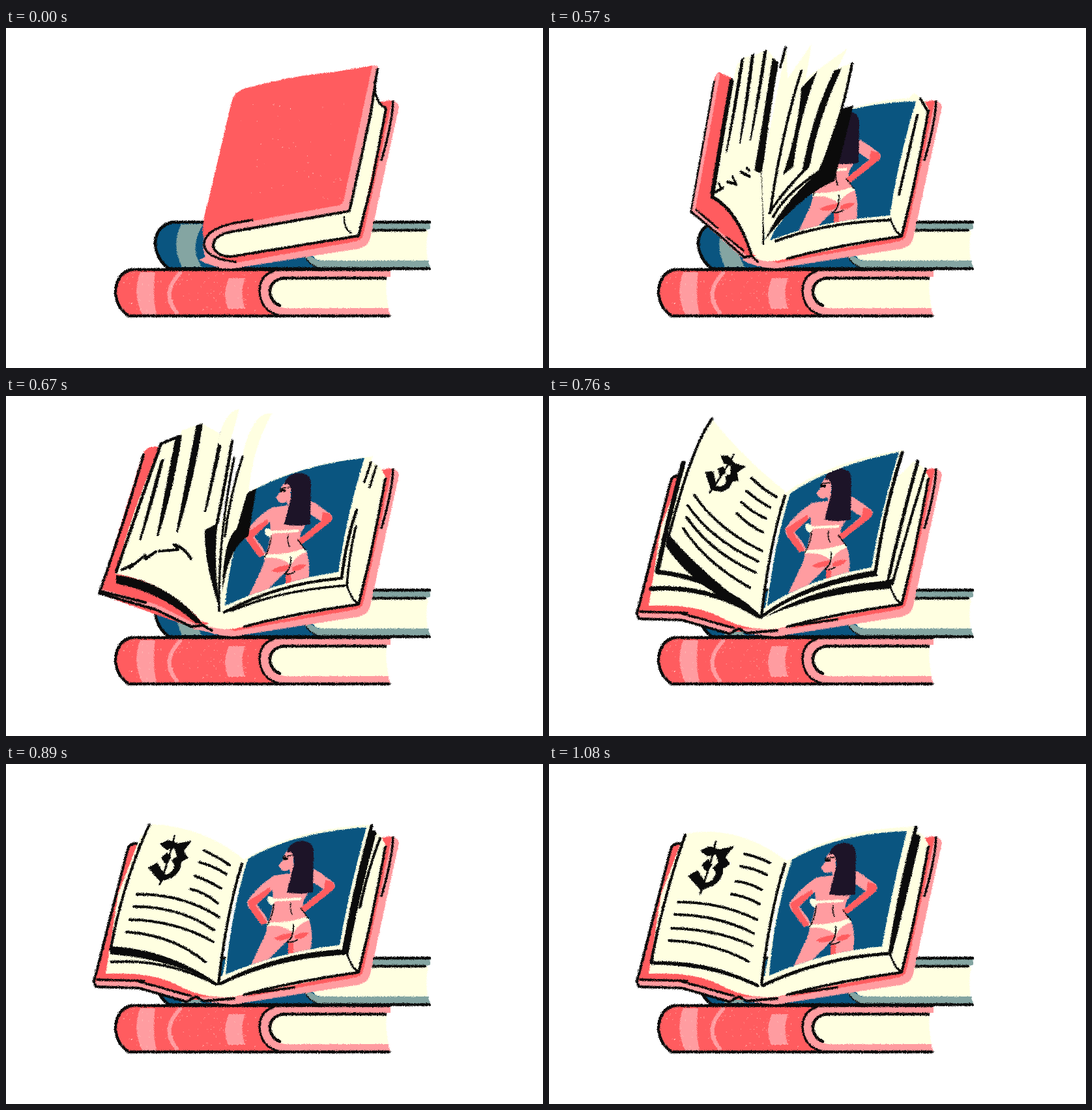
Animation, 824 px wide and 522 px high, one loop 1610 ms. Source, as an HTML page:

```html
<!DOCTYPE html>
<html lang="en">
<head>
<meta charset="utf-8">
<title>Books</title>
<style>
html, body { margin: 0; width: 100%; height: 100%; overflow: hidden; background: #fff; }
svg { display: block; width: 100vw; height: 100vh; }
</style>
</head>
<body>
<svg id="stage" viewBox="0 0 824 522"></svg>
<script>
const RED = '#ff5c5f', PINK = '#ff9ca0', CREAM = '#ffffe1', INK = '#0b0b0b',
      BLUE = '#0a5580', TEAL = '#84a5a2', HAIR = '#1d1428';

const fill = (color, d) => `<path d="${d}" fill="${color}"/>`;
const line = (width, d, color = INK) =>
  `<path d="${d}" fill="none" stroke="${color}" stroke-width="${width}" stroke-linecap="round" stroke-linejoin="round"/>`;
const group = (transform, content) => `<g transform="${transform}">${content}</g>`;

// Shadow between two pages: wide at the top, thin at the bottom.
const blade = (w, x1, y1, x2, y2) => fill(INK,
  `M${x1 - w} ${y1 + 3}L${x1 + 2} ${y1}Q${(x1 + x2) / 2 + w} ${(y1 + y2) / 2} ${x2 + 1} ${y2}H${x2 - 2}Z`);

// Blend every number of two path strings that share one structure.
function mix(a, b, t) {
  const to = b.match(/-?[\d.]+/g);
  let i = 0;
  return a.replace(/-?[\d.]+/g, n => +(+n + (to[i++] - n) * t).toFixed(2));
}
const mixAll = (a, b, t) => Object.fromEntries(Object.keys(a).map(k => [k, mix(a[k], b[k], t)]));

let seed = 7;
const random = () => (seed = seed * 16807 % 2147483647) / 2147483647;
function specks(count, x, y, w, h) {
  let d = '';
  while (count--) d += `M${(x + random() * w).toFixed(1)} ${(y + random() * h).toFixed(1)}h.1`;
  return line(1.1, d, '#ffc9c0');
}

// --- the two lying books
const blueBook =
  fill(BLUE, 'M255 298H570V369H250Q229 354 229 331Q233 303 255 298Z') +
  fill(TEAL, 'M269 301Q253 332 270 367H300Q280 334 303 301Z') +
  fill(TEAL, 'M540 299H651V309H540ZM455 345Q463 368 490 369H651L648 357H480Z') +
  fill(CREAM, 'M500 311H648Q643 335 647 357H484Q472 356 468 345Z') +
  line(4.5, 'M650 298H255Q230 304 229 331Q231 356 250 369.5H650') +
  line(4, 'M540 310.5H643') + line(1.5, 'M459 352Q466 364 478 367');

const redBook =
  fill(RED, 'M192 371H415V442H188Q169 428 168 404Q171 378 192 371Z') +
  fill(PINK, 'M206 375Q193 408 209 440H231Q224 408 229 375ZM342 384H367Q358 408 367 431H341Q331 408 342 384Z') +
  line(6, 'M267 376Q237 408 262 437', PINK) +
  fill(PINK, 'M590 373H415Q389 379 389 406Q391 436 418 441H590L586 430H430L415 407L430 382H590Z') +
  fill(CREAM, 'M584 384H428Q407 389 407 407Q408 427 428 430H587Q582 405 584 384Z') +
  line(4.5, 'M588 442H188Q168 428 168 403Q171 376 192 371H588') +
  line(3.5, 'M411 373Q389 380 389 404Q391 434 418 441') +
  line(4.5, 'M582 384H425Q404 389 405 406Q407 421 420 426') +
  specks(110, 178, 376, 206, 60);

const backCover =
  fill(PINK, 'M575 115Q598 104 603 121L559 322Q556 336 540 339L350 369Q320 369 296 356L330 340L530 312Z') +
  fill(RED, 'M574 113L592 112L549 314Q547 326 535 328L350 361L322 350L530 312Z') +
  line(3.5, 'M594 113Q592 150 576 203');

// --- closed and half-lifted book
const closed =
  fill(PINK, 'M567 57Q573 59 571 67L528 281L350 314L330 351L350 369Q302 374 302 330L348 110Z') +
  fill(CREAM, 'M565 100Q568 118 583 124L541 319L345 351Q318 348 318 333Q318 318 345 313L528 280Z') +
  fill(RED, 'M303 322Q299 302 310 267L346 114Q350 95 374 91Q440 73 500 68L562 58L518 265Q516 272 506 273L375 297Q316 306 303 322Z') +
  line(4, 'M570 63L559 135L527 281L345 313Q317 319 318 335Q323 351 345 351L541 319L562 235L583 124') +
  line(3.5, 'M566 82Q564 114 583 123') +
  line(3.5, 'M378 295Q302 304 304 334Q308 354 352 359') +
  line(2.5, 'M519 290Q518 308 530 315') + specks(45, 350, 105, 170, 160);

const lifting =
  fill(PINK, 'M505 47L514 56L471 264L345 312L330 351L352 367Q302 374 301 328L349 108Z') +
  fill(CREAM, 'M512 72L523 66L537 78L568 92L566 110L583 125L541 319L345 352Q318 350 318 334Q318 318 350 304L471 264Z') +
  fill(RED, 'M302 326Q297 304 307 264L347 112Q350 101 362 97Q430 70 504 48L463 241Q461 249 451 252Q318 294 302 326Z') +
  fill(INK, 'M513 69L524 67Q502 160 487 259L484 258Q492 160 508 90ZM541 97L556 94Q518 180 500 267L498 266Q507 180 541 97ZM564 112L574 111L578 120Q545 210 529 294L340 330Q390 300 521 288Q535 200 564 112Z') +
  line(3.5, 'M512 70L471 262Q380 287 343 306Q317 318 318 335Q323 352 345 352L541 319L563 230L580 128') +
  line(4, 'M537 79Q512 165 498 240') + line(3, 'M480 268Q400 285 360 302M506 269L518 279M526 305L531 317') +
  line(3.5, 'M362 287Q303 304 304 334Q311 354 352 358');

// --- the picture page
const woman =
  fill(PINK, 'M430 136Q424 144 424 150L417 159L422 166Q428 169 434 165L435 171L411 174Q389 187 370 212Q367 219 374 227L391 250L402 247L397 236L384 219L408 196Q411 226 400 248Q399 263 391 277L374 313L402 303L433 272L432 300L466 294Q472 261 463 239Q447 223 461 204L469 184L486 195L450 225L458 230L501 196Q507 190 501 184L474 165L440 160V136Z') +
  fill(RED, 'M370 214L374 227L391 250L400 247L382 220L405 199L404 192ZM489 181L487 195L450 225L458 230L501 196Q506 190 500 184ZM410 271Q420 277 434 270L440 262Q420 264 410 271ZM442 271Q455 274 464 262Q452 260 442 267ZM432 276L440 278V294H432Z') +
  fill(CREAM, 'M400 208Q404 203 411 210L452 208V212L412 214L408 220Q400 218 400 208ZM399 246Q430 248 461 237L465 242Q446 249 440 263Q425 248 399 252Z') +
  fill(HAIR, 'M430 139Q434 122 453 121Q471 122 471 138L470 200Q450 204 430 200L438 168Q445 148 436 138Z') +
  line(4, 'M425 148H430') + line(1.6, 'M424 145L438 143M410 218Q409 235 400 250M436 217Q434 226 438 234M451 224L463 240') +
  line(1.8, 'M440 250Q441 270 430 276Q438 278 446 273');

let clips = 0;
const picture = (d, shift) => {
  const id = 'clip' + clips++;
  return `<clipPath id="${id}"><path d="${d}"/></clipPath>` + fill(BLUE, d) +
    `<g clip-path="url(#${id})">${group(`translate(${shift})`, woman)}</g>`;
};

const rightBlock =
  fill(CREAM, 'M326 330L560 100L575 110L583 125L541 320L350 357Q325 361 292 349L300 330Z') +
  line(4, 'M582 127Q563 235 541 320Q440 334 366 354') + line(3, 'M524 293Q529 310 539 318');

// --- fluttering pages
const fanLeft =
  fill(RED, 'M225 68L258 78L208 258L290 270L310 350L290 357L158 283L212 82Q216 69 225 68Z') +
  line(8, 'M222 73L164 280L238 324L290 354L340 364', PINK) +
  line(4, 'M213 82L158 282L220 315L284 352L302 350L316 359') +
  line(3.5, 'M170 279L221 307M242 321L283 342') +
  fill(CREAM, 'M250 100L268 55L284 45L306 43L336 33L364 52L328 220L331 354L300 346Q268 285 207 258Z') +
  line(10, 'M254 82Q230 170 209 254') + line(6, 'M207 259Q266 278 300 346') +
  blade(6, 282, 45, 242, 192) + blade(6, 306, 39, 274, 178) + blade(6, 336, 33, 299, 173) +
  fill(INK, 'M350 46L365 53Q340 145 327 224L308 219Q330 135 350 46Z') +
  line(4, 'M325 222Q331 270 329 331') +
  line(4.5, 'M216 252L234 245M224 238L230 247M244 236L266 240M256 228L265 240M276 221L297 228M290 215L296 219');
const fanRight =
  fill(CREAM, 'M364 28L366 78L403 24L394 78L458 31L443 62L467 53L440 160L412 224L331 331L326 222Z') +
  fill(INK, 'M387 92L412 66Q383 140 375 213L359 226Q384 150 387 92ZM438 65L449 62Q411 145 401 209L388 221Q405 130 438 65ZM448 124L467 119L438 235Q385 257 331 326Q356 270 415 220Z') +
  line(4, 'M363 30L355 60M387 66Q355 170 340 280M465 55Q447 150 415 220Q360 257 344 290M398 212Q360 250 338 284');
const fanPicture =
  fill(CREAM, 'M440 132Q500 108 570 107L526 292Q420 300 330 334L345 300Z') +
  picture('M440 132Q500 113 563 113Q536 200 523 288Q420 295 339 326L360 280Z', '5 7') +
  line(4, 'M348 327Q425 298 522 295M570 109L581 127M565 134Q552 190 537 256');

const flutter =
  fill(RED, 'M222 78L240 78L170 272L290 280L310 350L290 357L143 304L208 94Q213 80 222 78Z') +
  line(8, 'M148 301L230 324L290 354L340 364', PINK) +
  line(4, 'M211 90Q186 180 143 303L230 328L284 354L302 352L316 360M146 300L214 317') +
  fill(CREAM, 'M238 75L265 64L270 53L300 42L347 68L345 110L326 200L331 354L300 346Q245 285 168 273Q195 170 238 75Z') +
  line(4.5, 'M266 62L238 73Q200 180 169 270') + fill(INK, 'M169 275Q250 285 302 350L290 348Q240 302 169 288Z') +
  blade(8, 268, 60, 233, 215) + blade(8, 300, 42, 263, 209) + blade(4, 241, 96, 206, 222) +
  blade(4, 333, 52, 306, 178) + line(4.5, 'M347 69Q337 130 324 195') +
  line(4, 'M178 267L195 258L190 264L214 244V250L230 239M235 238L264 236L258 228Q273 232 284 250') +
  fill(CREAM, 'M358 20Q334 24 325 72L340 85ZM408 27Q378 22 362 95L326 205L330 335L372 150Q378 80 408 27Z') +
  fill(CREAM, 'M370 148Q450 103 562 93L518 278Q420 285 328 337Z') +
  picture('M377 146Q450 106 550 95Q523 180 510 270Q420 284 336 322Q345 235 377 146Z', '-3 -3') +
  fill(INK, 'M305 206L325 195Q317 250 329 330Q304 260 305 206ZM370 149L384 142L372 215Q342 232 332 300Q333 220 354 204Z') +
  line(3.5, 'M350 95Q325 220 327 330M363 93Q344 150 336 215') +
  line(4.5, 'M538 175Q521 225 515 280Q420 287 335 332') +
  line(3.5, 'M537 200Q527 240 523 291Q420 298 345 330M560 102L550 132M568 108L558 140');

// --- the open spread settling: three key poses
const high = {
  leaf: 'M250 35Q298 95 362 146Q340 230 326 338Q250 270 185 215Q205 120 250 35Z',
  edge: 'M250 35Q218 80 184 215',
  shade: 'M182 210Q235 274 326 338Q225 300 179 230Z',
  under: 'M206 103Q180 200 166 270Q250 278 325 338M157 296Q245 290 322 338',
  underWidth: '7',
  rows: 'M311 126Q330 145 349 155M303 146Q321 161 339 171M295 163Q312 179 333 188M288 180Q308 200 328 209' +
        'M223 152Q258 204 327 238M213 168Q248 220 321 254M211 186Q248 240 317 271M206 203Q240 256 308 294',
  glyph: 'matrix(.72 .45 -.25 .87 268 121)',
  paper: 'M361 150Q430 100 543 83Q515 180 503 272Q400 285 330 336Z',
  photo: 'M370 150Q430 108 537 86Q508 180 495 263Q400 280 335 322Q345 230 370 150Z',
  shift: '-7 -10',
  rim: 'M542 87Q513 180 501 270Q400 286 330 336',
  hem: 'M514 284L528 280L524 296Q420 301 332 339Q410 291 514 284ZM497 264L505 276Q400 291 329 338Q390 283 497 264Z',
  fore: 'M566 100Q541 190 519 288',
  foreWidth: '5',
  stack: 'M578 112Q551 200 527 288'
};
const low = {
  leaf: 'M220 92Q305 96 365 147Q343 230 326 338Q250 284 160 280Q180 180 220 92Z',
  edge: 'M220 93Q180 180 161 282',
  shade: 'M160 278Q250 278 326 338Q250 299 160 292Z',
  under: 'M206 123Q178 220 160 285Q240 283 325 338M162 304Q245 298 322 338',
  underWidth: '4',
  rows: 'M304 133Q324 142 343 155M297 151Q318 156 338 169M290 172Q308 178 330 191M283 192Q304 196 325 214' +
        'M201 200Q270 199 327 235M196 219Q265 218 319 255M190 239Q260 240 318 273M185 258Q255 262 306 304',
  glyph: 'matrix(.95 .03 0 .95 251 148)',
  paper: 'M365 147Q440 100 561 93Q535 190 520 288Q415 292 330 337Z',
  photo: 'M371 146Q440 105 553 97Q525 200 512 278Q420 288 337 323Q345 230 371 146Z',
  shift: '1 -3',
  rim: 'M561 95Q535 190 518 287Q415 292 330 337',
  hem: 'M514 285L526 284L522 293Q420 297 332 338Q410 291 514 285ZM514 284L522 291Q420 297 330 338Q410 290 514 284Z',
  fore: 'M564 106Q541 190 522 288',
  foreWidth: '8',
  stack: 'M574 114Q556 160 543 220'
};
const rest = {
  leaf: 'M209 107Q290 92 365 149Q343 230 326 340Q250 300 158 303Q178 200 209 107Z',
  edge: 'M209 109Q175 205 157 304',
  shade: 'M157 301Q240 299 320 340Q240 308 157 308Z',
  under: 'M209 109Q176 210 157 304Q240 302 320 340M157 304Q240 303 320 340',
  underWidth: '5',
  rows: 'M300 138Q320 142 339 152M294 157Q315 160 334 170M287 180Q307 182 326 193M280 200Q302 203 323 215' +
        'M198 212Q265 212 319 239M193 231Q260 232 314 260M188 252Q258 254 312 279M184 271Q250 273 306 303',
  glyph: 'matrix(1 0 0 1 248 159)',
  paper: 'M365 149Q440 100 562 96Q538 190 523 291Q420 298 328 340Z',
  photo: 'M373 147Q440 107 549 103Q525 200 511 280Q420 288 338 325Q345 230 373 147Z',
  shift: '0 0',
  rim: 'M563 97Q538 190 523 291Q420 296 328 340',
  hem: 'M518 290L526 288L524 293Q420 298 330 340Q410 294 518 290ZM518 290L524 293Q420 298 328 340Q410 294 518 290Z',
  fore: 'M563 111Q543 200 523 288',
  foreWidth: '8',
  stack: 'M568 112Q549 195 526 285'
};

const letter =
  fill(INK, 'M-16 -26L-2 -33L14 -28L36 -33L23 -16L30 -5L19 2Q20 16 4 28L-15 35L-35 13L-20 4L-8 23Q5 22 8 8L3 0L12 -7L8 -20L-5 -17ZM-14 -4L-4 -13L3 -4L-7 6Z') +
  line(3, 'M8 -40Q0 -5 -16 40');

const openBase =
  fill(RED, 'M207 122H194Q188 122 186 130L135 333L204 341L278 362L335 362L326 330Z') +
  fill(PINK, 'M137 333L205 335L286 357L345 358L375 354L350 369L302 365L291 357L276 366L204 345L137 342Z') +
  line(4, 'M204 122Q191 120 187 130L135 334L138 342L204 344L277 365L291 357L303 364L350 360') +
  line(3.5, 'M140 331L212 333M204 334L283 356M365 354L442 343') +
  fill(CREAM, 'M207 109L172 200L153 322Q222 319 262 339Q300 360 340 357L326 330L320 180Z');

const spread = s => openBase + rightBlock +
  line(s.underWidth, s.under) + line(4, s.stack) + line(s.foreWidth, s.fore) + fill(INK, s.hem) +
  fill(CREAM, s.paper) + picture(s.photo, s.shift) + line(5, s.rim) +
  fill(INK, s.shade) + fill(CREAM, s.leaf) + line(4, s.edge) +
  line(4, s.rows) + group(s.glyph, letter) +
  line(4, 'M362 153Q338 230 326 338');

const turning = { ...high,
  leaf: 'M322 24Q338 100 361 150Q340 230 326 338Q285 250 232 178Q270 90 322 24Z',
  edge: 'M322 24Q272 85 232 178',
  shade: 'M230 176Q268 262 326 338Q250 280 226 195Z',
  rows: high.rows.replace(/(\d+) (\d+)/g, (_, x, y) => `${326 + (x - 326) * .6} ${y - 12}`),
  glyph: 'matrix(.4 .4 -.1 .9 304 98)'
};

const poses = [
  [0, closed],
  [500, lifting],
  [570, rightBlock + fanPicture + group('matrix(.65 0 0 1 115 0)', fanLeft) + fanRight],
  [600, rightBlock + fanPicture + fanLeft + fanRight],
  [670, rightBlock + flutter],
  [700, spread(turning)],
  [760, spread(high)],
  [830, spread(mixAll(high, low, .55))],
  [890, spread(low)],
  [920, spread(mixAll(low, rest, .5))],
  [980, spread(mixAll(low, rest, .9))],
  [1080, spread(rest)]
];
const LOOP = 1610;

const stage = document.getElementById('stage');
stage.innerHTML = `
  <filter id="chalk" filterUnits="userSpaceOnUse" x="0" y="0" width="824" height="522" color-interpolation-filters="sRGB">
    <feTurbulence type="fractalNoise" baseFrequency=".8" numOctaves="2" seed="4"/>
    <feDisplacementMap in="SourceGraphic" scale="4" xChannelSelector="R" yChannelSelector="G"/>
  </filter>
  <g filter="url(#chalk)">${blueBook}${redBook}${backCover}
    ${poses.map(([, art]) => `<g class="pose" display="none">${art}</g>`).join('')}
  </g>`;
const layers = stage.querySelectorAll('.pose');

let shown = -1;
function draw() {
  const t = performance.now() % LOOP;
  const now = poses.findLastIndex(([start]) => t >= start);
  if (now !== shown) {
    layers.forEach((layer, i) => layer.setAttribute('display', i === now ? 'inline' : 'none'));
    shown = now;
  }
  requestAnimationFrame(draw);
}
draw();
</script>
</body>
</html>
```
